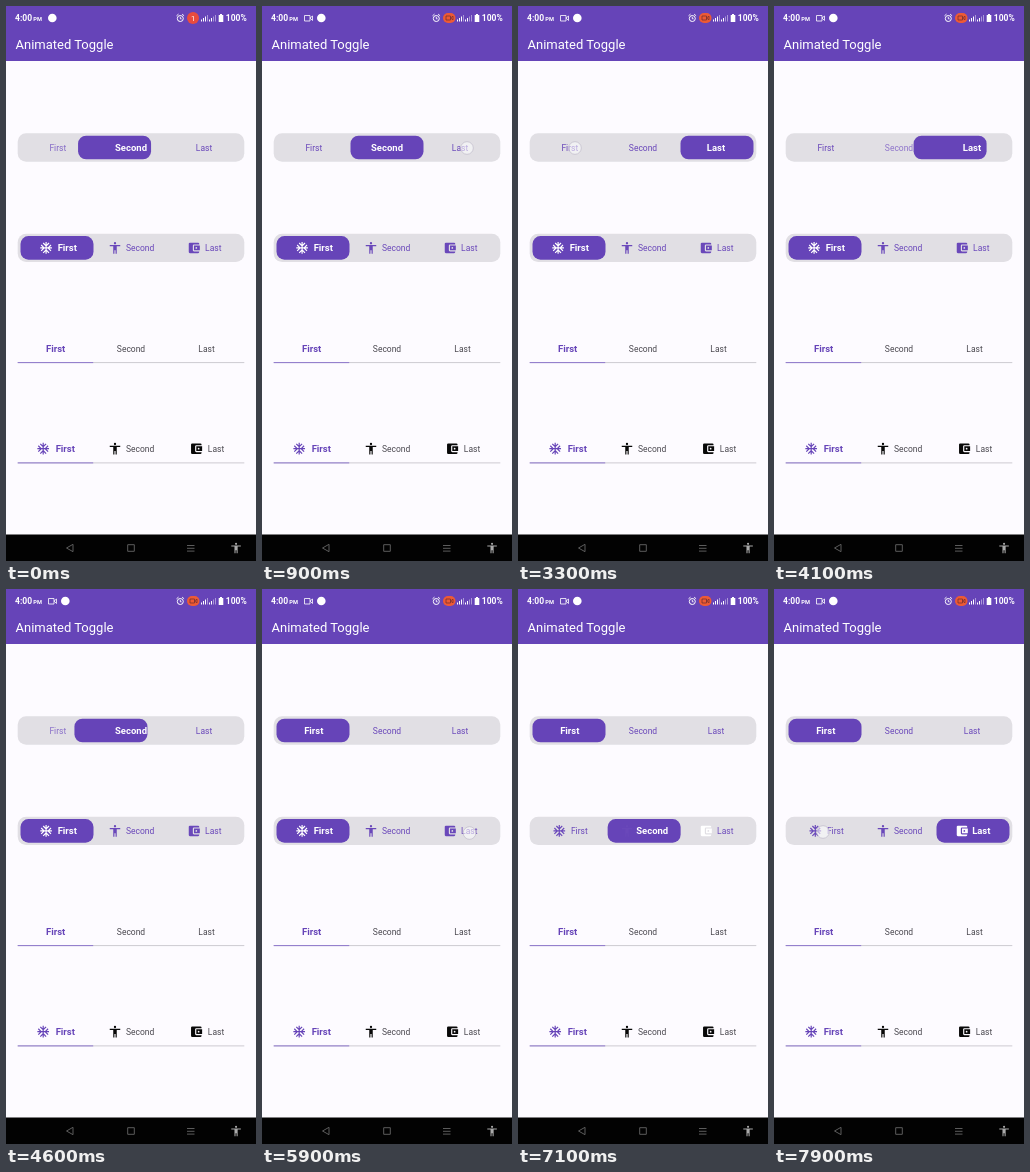
An HTML page for the animation above (8000 ms loop, 250 px wide and 555 px high).

```html
<!DOCTYPE html>
<html lang="en">
<head>
<meta charset="utf-8">
<title>Animated Toggle</title>
<style>
  html, body { margin: 0; width: 100%; height: 100%; overflow: hidden; background: #fdfbff; }
  svg { display: block; width: 250px; height: 555px; font-family: Roboto, Arial, sans-serif; }
</style>
</head>
<body>
<svg id="stage" viewBox="0 0 250 555">
  <defs>
    <g id="snow" fill="none" stroke="currentColor" stroke-width="2">
      <path id="arm" d="M12 2v20M7 3.6l5 5 5-5M7 20.4l5-5 5 5"/>
      <use href="#arm" transform="rotate(90 12 12)"/>
    </g>
    <path id="person" fill="currentColor" d="M12 2a2 2 0 1 1 0 4a2 2 0 1 1 0-4zM21 9h-6v13h-2v-6h-2v6H9V9H3V7h18z"/>
    <path id="wallet" fill="currentColor" fill-rule="evenodd" d="M21 18v1a2 2 0 0 1-2 2H5a2 2 0 0 1-2-2V5a2 2 0 0 1 2-2h14a2 2 0 0 1 2 2v1h-9a2 2 0 0 0-2 2v8a2 2 0 0 0 2 2zM12 16h10V8H12zM16 10.5a1.5 1.5 0 1 1 0 3a1.5 1.5 0 1 1 0-3z"/>
  </defs>

  <rect width="250" height="555" fill="#fdfbff"/>
  <rect width="250" height="55" fill="#6644b8"/>
  <g fill="#fff">
    <text x="9.5" y="43" font-size="13">Animated Toggle</text>
    <g font-weight="700">
      <text x="9" y="15.3" font-size="8.5">4:00</text>
      <text x="27.3" y="15.3" font-size="5.7">PM</text>
      <text x="219.8" y="15.3" font-size="8.5">100%</text>
    </g>
    <circle id="badge" cy="12" r="4.3"/>
    <g fill="none" stroke="#fff">
      <path id="camera" d="M42.5 9.5h5.5v5.500h-5.500zM48 12l2.500-2v4.500z" stroke-width=".8"/>
      <circle cx="174.300" cy="12.500" r="3" stroke-width="1"/>
      <path d="M174.300 10.800v2h1.300M170.500 9.800l2-1.700M178.100 9.800l-2-1.700" stroke-width=".9"/>
    </g>
    <path d="M195 15.500v-2h1v2zM197 15.500v-3.500h1v3.500zM199 15.500v-5h1v5zM203 15.500v-2h1v2zM205 15.500v-3.500h1v3.500z"/>
    <path d="M201 15.500v-6.500h1v6.500zM207 15.500v-5h1v5zM209 15.500v-6.500h1v6.500z" opacity=".45"/>
    <path d="M212.700 9h1.300v-1h2v1h1.300v7h-4.600z"/>
    <g id="countdown">
      <circle cx="187" cy="12" r="6" fill="#e94b3e"/>
      <text x="187" y="14.700" font-size="7.500" text-anchor="middle">1</text>
    </g>
    <g id="recording">
      <rect x="181" y="7" width="12.500" height="10" rx="5" fill="#ed5a35"/>
      <path d="M184 10h4.500v4h-4.500zM188.500 12l2.500-1.800v3.600z" fill="none" stroke="#79302f" stroke-width=".8"/>
    </g>
  </g>

  <g id="tabs"></g>

  <circle id="touch" r="6.3" fill="#fff" fill-opacity=".55" stroke="#b9b4c4" stroke-opacity=".75" stroke-width=".8"/>

  <rect y="528.500" width="250" height="27" fill="#020202"/>
  <g fill="none" stroke="#5c5c5c">
    <path d="M60.500 542l6.500-3.700v7.400zM121.700 538.700h6.600v6.600h-6.600z"/>
    <path d="M181 539.500h7.500M181 542.300h7.500M181 545.100h7.500"/>
  </g>
  <use href="#person" transform="translate(223.700 535.700) scale(.53)" color="#aaa"/>
</svg>

<script>
const LOOP = 8000, SLIDE = 1040;
const PURPLE = [106, 72, 186], WHITE = [255, 255, 255];
const LABELS = ['First', 'Second', 'Last'];
const ICONS = ['snow', 'person', 'wallet'];
const byId = id => document.getElementById(id);
const tabs = byId('tabs');

function add(tag, attrs) {
  const el = document.createElementNS('http://www.w3.org/2000/svg', tag);
  for (const key in attrs) el.setAttribute(key, attrs[key]);
  return tabs.appendChild(el);
}

function addLabel(text, x, y, bold, fill) {
  const el = add('text', { x, y, 'text-anchor': 'middle', fill });
  el.textContent = text;
  setBold(el, bold);
  return el;
}

function setBold(el, bold) {
  el.setAttribute('font-weight', bold ? 700 : 400);
  el.setAttribute('font-size', bold ? 9.5 : 8.5);
}

const iconPlace = (x, y) => `translate(${x - 7} ${y - 7}) scale(.583)`;
const addIcon = (name, x, y, color) =>
  add('use', { href: '#' + name, transform: iconPlace(x, y), color });

function addPill(top, centers, iconCenters) {
  add('rect', { x: 11.7, y: top, width: 226.6, height: 28.4, rx: 8.5, fill: '#e1dfe4' });
  const thumb = add('rect', { y: top + 2.4, width: 73, height: 23.6, rx: 8, fill: '#6644b8' });
  const icons = iconCenters.map((x, i) => addIcon(ICONS[i], x, top + 14.2));
  const labels = LABELS.map((text, i) => addLabel(text, centers[i], top + 17.3));
  return { thumb, icons, labels, iconCenters, iconY: top + 14.2 };
}

function addUnderlined(y, centers, iconCenters) {
  LABELS.forEach((text, i) => addLabel(text, centers[i], y - 11.2, i === 0, i ? '#4b4950' : '#6644b8'));
  iconCenters.forEach((x, i) => addIcon(ICONS[i], x, y - 14.3, i ? '#080808' : '#6644b8'));
  add('rect', { x: 11.7, y: y - .6, width: 226.6, height: 1, fill: '#cdcad1' });
  add('rect', { x: 11.7, y: y - .6, width: 75.5, height: 1, fill: '#8f78cc' });
}

const plain = addPill(127.3, [51.8, 125, 198], []);
const iconic = addPill(227.7, [61.3, 134.2, 207.3], [41.3, 109, 188]);
addUnderlined(356.7, [49.6, 125, 200.5], []);
addUnderlined(457, [59.3, 134.2, 210], [37.2, 109, 190.3]);

// Each slide: start time, from tab, to tab
const plainSlides = [[-808, 0, 1], [1236, 1, 2], [3940, 2, 0]];
const iconicSlides = [[6573, 0, 2]];
// Each touch: start, end, x, y
const touches = [[900, 1200, 205, 142], [3300, 3900, 57, 142], [5900, 6530, 207.5, 244], [7900, 8000, 49, 243]];

function slideState(slides, t) {
  let position = slides[0][1], target = position;
  for (const [start, from, to] of slides) {
    if (t < start) break;
    position = from + (to - from) * Math.min(1, (t - start) / SLIDE);
    target = to;
  }
  return { position, target };
}

const mix = k => `rgb(${PURPLE.map((c, i) => Math.round(c + (WHITE[i] - c) * k))})`;

function drawPill(pill, { position, target }) {
  pill.thumb.setAttribute('x', 14.5 + 74 * position);
  const active = position < 2 / 3 ? 0 : position < 4 / 3 ? 1 : 2;
  pill.labels.forEach((label, i) => {
    const near = Math.max(0, 1 - Math.abs(position - i));
    setBold(label, i === active);
    label.setAttribute('fill', mix(i === active ? Math.min(1, 2 * near) : .8 * near));
  });
  pill.icons.forEach((icon, i) => {
    icon.setAttribute('color', mix(i === target ? 1 : 0));
    const shift = i === active ? -1.2 : 0;
    icon.setAttribute('transform', iconPlace(pill.iconCenters[i] + (i === 0 ? shift : 0), pill.iconY));
  });
}

const show = (id, on) => byId(id).setAttribute('visibility', on ? 'visible' : 'hidden');

function render(t) {
  drawPill(plain, slideState(plainSlides, t));
  drawPill(iconic, slideState(iconicSlides, t));

  const recording = t >= 500;
  show('countdown', !recording);
  show('recording', recording);
  show('camera', recording);
  byId('badge').setAttribute('cx', recording ? 59.3 : 46.3);

  const touch = touches.find(([start, end]) => t >= start && t < end);
  show('touch', touch);
  if (touch) {
    byId('touch').setAttribute('cx', touch[2]);
    byId('touch').setAttribute('cy', touch[3]);
  }
}

const begin = performance.now();
function tick() {
  render((performance.now() - begin) % LOOP);
  requestAnimationFrame(tick);
}
tick();
</script>
</body>
</html>
```
